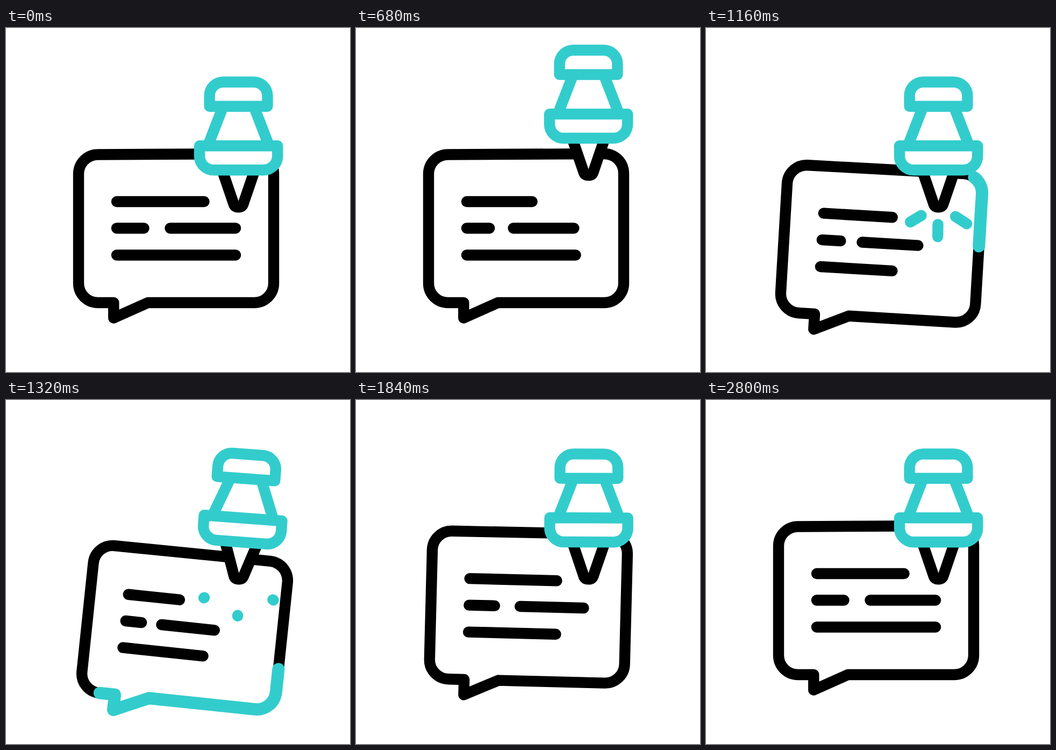
Animation of 640x640 px, one loop 3000 ms. Source, as an HTML page:

```html
<!DOCTYPE html>
<html lang="en">
<head>
<meta charset="utf-8">
<title>Pinned message</title>
<style>
  html, body { margin: 0; width: 100%; height: 100%; overflow: hidden; background: #fff; }
  svg { display: block; width: 100vw; height: 100vh; }
  .ink, .teal { fill: none; stroke-width: 20.4; stroke-linecap: round; stroke-linejoin: round; }
  .ink { stroke: #000; }
  .teal { stroke: #33cccc; }
  .solid { fill: #fff; }
  .flat { stroke-linecap: butt; }
</style>
</head>
<body>
<svg viewBox="0 0 640 640" xmlns="http://www.w3.org/2000/svg">
  <defs>
    <path id="outline" pathLength="1" d="M478.5 238A36 36 0 0 1 498 270V475A36 36 0 0 1 462 511H264L200.3 539.5V511H171A36 36 0 0 1 135 475V271.5A36 36 0 0 1 171 235.5L462 234A36 36 0 0 1 478.5 238Z"/>
  </defs>
  <g id="bubble">
    <use href="#outline" class="ink"/>
    <g id="text" class="ink"></g>
    <use href="#outline" id="runner" class="teal" style="stroke-width:23"/>
  </g>
  <g id="sparks" class="teal"></g>
  <g id="pin">
    <path class="ink solid" d="M402 264L423.5 327Q425.5 333.3 432.5 333.3T441.5 327L463 264"/>
    <path class="solid" d="M401 150L378 216H487L464 150Z"/>
    <path class="teal flat" d="M402.3 150L377.6 214M462.7 150L487.4 214"/>
    <path class="teal solid" d="M378.6 145.8V126A25.5 25.5 0 0 1 404 100.5H461A25.5 25.5 0 0 1 486.4 126V145.8Z"/>
    <path class="teal solid" d="M360 219.3H505.2V238A26 26 0 0 1 479 264.2H386A26 26 0 0 1 360 238Z"/>
  </g>
</svg>
<script>
const $ = id => document.getElementById(id);
const LOOP = 3000, STEP = 40, LAST = 2800;

// y, left end, right end, shrink of left, shrink of right, period
const rows = [
  [323, 206, 368.5, 0, 72, 2800 / 3],
  [372.5, 206, 256.5, 0, 21, 2600 / 3],
  [372.5, 305.5, 427, 32.6, 55.2, 2600 / 3],
  [422.5, 206, 427, 0, 89.5, 800]
];
const rays = [[-64, 38.3], [-1, 72], [65.5, 42.3]];
const tip = [432, 330];

const addLine = parent => parent.appendChild(
  document.createElementNS('http://www.w3.org/2000/svg', 'line'));
const rowLines = rows.map(() => addLine($('text')));
const rayLines = rays.map(() => addLine($('sparks')));

function setLine(el, x1, y1, x2, y2) {
  Object.entries({ x1, y1, x2, y2 }).forEach(([k, v]) => el.setAttribute(k, v));
}

const part = (t, a, b) => Math.min(1, Math.max(0, (t - a) / (b - a)));
const ease = (t, a, b) => (1 - Math.cos(Math.PI * part(t, a, b))) / 2;
const easeOut = (t, a, b) => Math.sin(Math.PI / 2 * part(t, a, b));
const show = (el, on) => el.setAttribute('visibility', on ? 'visible' : 'hidden');

function drawRows(t) {
  rows.forEach(([y, left, right, dl, dr, period], i) => {
    const k = t < 3 * period ? (1 - Math.cos(2 * Math.PI * t / period)) / 2 : 0;
    setLine(rowLines[i], left - dl * k, y, right - dr * k, y);
  });
}

function drawBubble(t) {
  const angle = 6.1 * (easeOut(t, 1040, 1360) - ease(t, 1360, 2070));
  $('bubble').setAttribute('transform', `rotate(${angle} -154 551)`);
  const from = ease(t, 1136, 1836), to = ease(t, 1040, 1600);
  show($('runner'), to > from);
  $('runner').setAttribute('stroke-dasharray', `${Math.max(0, to - from)} 2`);
  $('runner').setAttribute('stroke-dashoffset', -from);
}

function drawSparks(t) {
  const near = 0.45, reach = k => near + (1 - near) * k;
  const head = reach(ease(t, 1040, 1240)), tail = reach(ease(t, 1120, 1345));
  show($('sparks'), head > tail);
  rays.forEach(([dx, dy], i) => setLine(rayLines[i],
    tip[0] + dx * tail, tip[1] + dy * tail,
    tip[0] + dx * head, tip[1] + dy * head));
}

function drawPin(t) {
  const lift = 59.2 * (ease(t, 0, 416) - ease(t, 840, 1040));
  const angle = 17.1 * (ease(t, 1240, 1480) - ease(t, 1480, 1870));
  $('pin').setAttribute('transform', `translate(0 ${-lift}) rotate(${angle} 432.5 333)`);
}

function draw(ms) {
  const t = Math.min(LAST, Math.floor(ms % LOOP / STEP) * STEP);
  drawRows(t);
  drawBubble(t);
  drawSparks(t);
  drawPin(t);
}

function tick() {
  draw(performance.now());
  requestAnimationFrame(tick);
}
tick();
</script>
</body>
</html>
```
